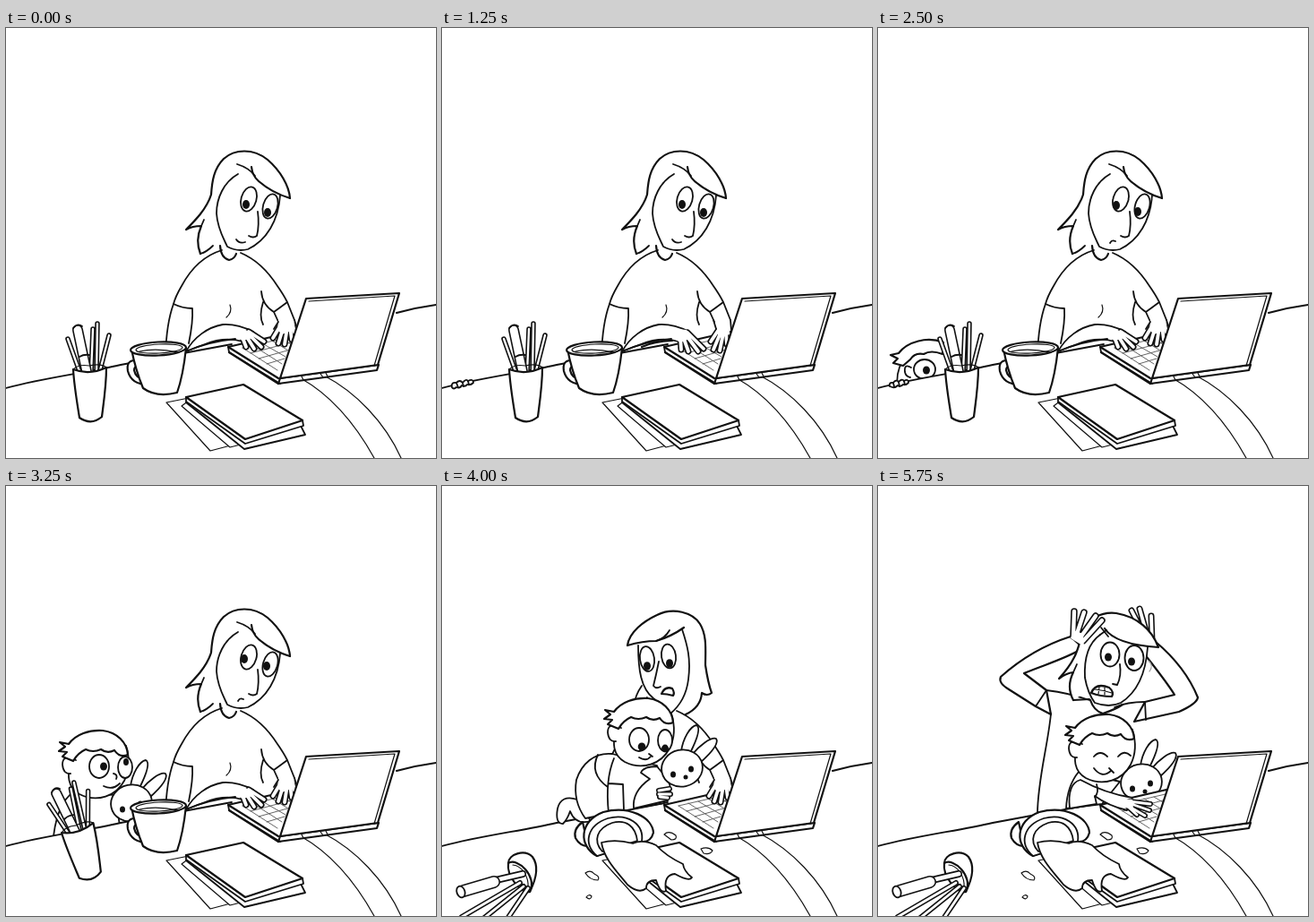
Animation, 480 px wide and 480 px high, one loop 6 s. Source, as an HTML page:

```html
<!DOCTYPE html>
<html lang="en">
<head>
<meta charset="utf-8">
<title>Working at home</title>
<style>
html, body { margin: 0; width: 100%; height: 100%; overflow: hidden; background: #fff; }
svg { display: block; width: 100vw; height: 100vh; }
path, ellipse { fill: #fff; stroke: #111; stroke-width: 1.8; stroke-linejoin: round; stroke-linecap: round; }
.line { fill: none; }
.thin { stroke-width: 1.2; }
.keys { fill: none; stroke: #555; stroke-width: .9; }
.bold { stroke-width: 2.2; }
.dot { fill: #111; stroke: none; }
.bare { stroke: none; }
.tube { fill: none; stroke-width: var(--w); }
.core { stroke: #fff; stroke-width: calc(var(--w) - 3.2px); }
</style>
</head>
<body>
<svg viewBox="0 0 480 480">
<defs>
  <g id="kidHead">
    <path d="M221 290C219 305 218 318 232 326C252 336 273 328 282 311C288 299 288 285 284 272L240 262Z"/>
    <path d="M228 288Q213 281 213 293Q214 304 222 303"/>
    <path class="bold" d="M225 289L213 284L218 279L209 278L216 273L210 268L220 270C228 259 243 254 258 255C274 257 285 268 286 282Q277 286 271 277Q263 281 256 276Q247 280 239 276Q230 280 225 289Z"/>
  </g>
  <g id="kidEyes">
    <ellipse cx="248" cy="301" rx="11" ry="13"/><ellipse cx="277" cy="302" rx="8" ry="12"/>
  </g>
  <g id="lookDown">
    <use href="#kidHead"/><use href="#kidEyes"/>
    <ellipse class="dot" cx="251" cy="309" rx="4.3" ry="4.6"/><ellipse class="dot" cx="277" cy="311" rx="4" ry="4.4"/>
    <path class="line" d="M248 321Q256 326 261 320M259 317L263 320"/>
  </g>
  <g id="lookUp">
    <use href="#kidHead"/><use href="#kidEyes" x="6" y="-6"/>
    <ellipse class="dot" cx="259" cy="295" rx="4" ry="4.6"/><ellipse class="dot" cx="284" cy="290" rx="3" ry="4"/>
    <path class="line" d="M259 317Q269 322 277 314M270 303Q275 304 273 309"/>
  </g>
  <g id="rabbit">
    <path d="M-1 -19C1 -33 9 -47 16 -48C22 -45 15 -29 9 -17Z"/>
    <path d="M11 -15C19 -25 32 -35 38 -33C42 -27 29 -14 20 -6Z"/>
    <ellipse rx="23" ry="20.5" transform="rotate(-12)"/>
    <path class="bare" d="M1 -17L8 -17L17 -10L8 -6Z"/>
    <ellipse class="dot" cx="-10" cy="7" rx="3" ry="3.5"/><ellipse class="dot" cx="10" cy="1" rx="3" ry="3.5"/>
    <ellipse class="dot" cx="4" cy="10" rx="2.5" ry="2.5"/>
  </g>
  <g id="fallenPens">
    <path class="bold" d="M74 421C74 411 92 405 101 414C109 425 104 441 98 453Z"/>
    <path class="bold" d="M74 421C84 414 107 436 98 453C88 455 72 436 74 421Z"/>
    <path class="line thin" d="M79 423C90 424 97 437 96 448"/>
    <path class="tube" style="--w:6px" d="M22 481L87 443M46 483L91 447M73 483L96 449"/>
    <path class="tube" style="--w:8px" d="M60 440L90 433"/>
    <path class="tube" style="--w:14px" d="M24 452L58 442"/>
    <ellipse cx="21" cy="453" rx="4.5" ry="6.5" transform="rotate(-18 21 453)"/>
  </g>
</defs>

<!-- mother at work -->
<g data-on="0-16">
  <path class="bare" d="M242 249Q205 262 187 308L178 358L290 350L322 326L314 306Q296 265 262 250Z"/>
  <path class="line" d="M241 248C218 255 204 273 196 288Q189 300 187 308"/>
  <path data-on="0-13" class="line" d="M187 308Q179 330 178 366M187 308Q197 313 208 313Q209 328 204 352"/>
  <path class="line" d="M262 251C281 259 294 274 303 288Q310 298 314 306Q306 312 299 317Q286 309 285 294M287 306Q282 322 287 331M299 317L304 328M314 306L322 326"/>
  <path class="line thin" d="M250 309Q253 317 246 323"/>
</g>
<g data-on="0-13">
  <path class="bold" d="M317 190C316 176 306 159 292 147C276 134 255 135 243 146C232 157 230 171 229 186C224 202 211 215 201 225Q208 221 218 221Q211 237 217 252"/>
  <path class="line" d="M218 221L221 214M217 252Q224 250 231 243"/>
  <path d="M259 163C243 172 235 190 235 207C236 224 243 235 247 244Q258 250 270 247C291 237 304 215 306 187"/>
  <path class="line bold" d="M239 243Q240 257 249 259Q255 258 257 252"/>
  <path class="line bold" d="M274 155Q275 165 282 171Q297 184 317 190"/>
  <path class="line" d="M258 152Q271 156 278 165"/>
  <path class="line" d="M281 205Q283 220 280 232Q276 235 271 232"/>
  <g data-on="0-2 4-13">
    <ellipse cx="271" cy="191" rx="8.5" ry="14" transform="rotate(16 271 191)"/>
    <ellipse cx="295" cy="199" rx="8" ry="14" transform="rotate(16 295 199)"/>
  </g>
  <g data-on="0-2 4-7"><ellipse class="dot" cx="268" cy="197" rx="4" ry="5"/><ellipse class="dot" cx="292" cy="206" rx="4" ry="5"/></g>
  <g data-on="8-12"><ellipse class="dot" cx="266" cy="198" rx="4" ry="5"/><ellipse class="dot" cx="290" cy="205" rx="4" ry="5"/></g>
  <g data-on="13"><ellipse class="dot" cx="266" cy="193" rx="4" ry="5"/><ellipse class="dot" cx="291" cy="201" rx="4" ry="5"/></g>
  <path data-on="3" class="line bold" d="M262 194Q269 201 278 196M286 202Q294 209 302 204"/>
  <path data-on="0-8" class="line" d="M257 236Q260 241 267 239"/>
  <path data-on="9-13" class="line" d="M259 240Q261 236 265 238"/>
</g>

<!-- mother facing the child -->
<g data-on="14-16">
  <path class="bold" d="M207 178C209 163 225 151 240 144C258 135 280 141 288 154C296 167 294 184 294 200Q297 220 301 231Q296 235 290 231Q289 247 272 255"/>
  <path class="line" d="M223 223Q216 233 214 245Q221 243 229 236"/>
  <path d="M219 178C219 205 222 226 236 237Q241 240 241 246Q246 257 255 254Q272 240 275 216C278 193 274 178 268 160"/>
  <path class="line bold" d="M207 178Q224 173 239 173Q256 168 270 158"/>
  <path class="line" d="M239 173Q249 170 254 161"/>
  <ellipse cx="229" cy="193" rx="8" ry="14" transform="rotate(-8 229 193)"/>
  <ellipse cx="253" cy="190" rx="8" ry="13.5" transform="rotate(-8 253 190)"/>
  <ellipse class="dot" cx="229" cy="201" rx="4" ry="4.8"/><ellipse class="dot" cx="254" cy="198" rx="4" ry="4.8"/>
  <path class="line" d="M242 196Q239 211 236 223Q239 227 244 224"/>
  <path data-on="14" class="line" d="M249 231Q252 233 250 237"/>
  <path data-on="15-16" class="bold" d="M245 232Q249 223 257 226Q260 231 258 234Q251 232 245 232Z"/>
</g>

<!-- mother with raised hands -->
<g data-on="17-21">
  <path class="bare" d="M234 239Q204 242 188 270L178 365L300 350L298 280Q290 255 268 245Z"/>
  <path class="line" d="M229 238C207 243 195 256 187 270M192 290C185 313 178 331 178 366M266 245Q289 254 297 279"/>
  <path d="M165 263C160 286 154 303 153 320Q155 334 166 335C176 329 184 307 193 290L176 283L189 262Z"/>
  <path class="line" d="M176 283L193 290"/>
  <path class="tube" style="--w:7.5px" d="M168 263L158 254L150 244M170 260L155 229M174 259L168 225M178 259L182 229M166 262L158 261"/>
  <path class="bare" d="M163 259L171 248L181 250L187 263L168 269Z"/>
  <path class="line" d="M183 244Q185 255 189 262M159 264L165 267"/>
  <path d="M298 279L304 264Q317 265 319 277L304 291Z"/>
  <path class="tube" style="--w:7.5px" d="M306 275L299 257M310 272L317 240M313 272L331 241M315 275L340 252M315 278L339 266"/>
  <path class="bare" d="M303 273L311 264L320 272L309 286Z"/>
</g>
<g data-on="22-23">
  <path class="bare" d="M188 228L235 238L262 247L298 241L297 262L280 360L178 366L192 254Z"/>
  <path class="line" d="M188 228Q213 231 236 239M264 247Q278 241 298 241M193 254C190 288 178 329 178 366"/>
  <path class="bold" d="M215 168C190 176 165 188 137 213Q134 220 146 227L176 246L193 255L188 228L163 209C187 199 209 193 229 181Z"/>
  <path class="bold" d="M310 174C329 190 346 209 357 236Q356 243 336 252L286 263L298 241L331 233C321 217 307 200 297 187Z"/>
  <path class="line" d="M188 228L176 246M298 241L299 261"/>
  <path class="tube" style="--w:7px" d="M300 172L283 139M302 172L292 137M306 174L305 145"/>
</g>
<g data-on="17-23">
  <path class="bold" d="M313 180C306 161 290 146 266 142C248 140 235 149 229 163C223 177 225 190 202 215Q210 209 218 208Q210 224 218 239"/>
  <path class="line" d="M218 208L222 199M218 239L236 238"/>
  <path d="M248 166C234 176 230 195 231 214Q234 231 242 242Q258 248 271 242C290 230 299 208 301 180"/>
  <path class="line bold" d="M237 239Q241 251 251 254Q266 249 273 244"/>
  <path class="line bold" d="M253 159Q265 177 313 180"/>
  <path class="line" d="M248 166L255 161M249 158L257 168"/>
  <g data-on="17-20">
    <ellipse cx="259" cy="187" rx="8" ry="13" transform="rotate(12 259 187)"/><ellipse cx="286" cy="192" rx="9" ry="14" transform="rotate(12 286 192)"/>
    <ellipse class="dot" cx="257" cy="195" rx="4" ry="4.7"/><ellipse class="dot" cx="283" cy="202" rx="4.2" ry="4.7"/>
  </g>
  <g data-on="21-23">
    <ellipse cx="259" cy="188" rx="10.5" ry="13.5"/><ellipse cx="286" cy="192" rx="10.5" ry="14"/>
    <ellipse class="dot" cx="257" cy="191" rx="4" ry="4.5"/><ellipse class="dot" cx="283" cy="196" rx="4" ry="4.5"/>
  </g>
  <path class="line" d="M270 199Q272 212 267 222L262 221"/>
  <path data-on="17-19" class="line" d="M248 238Q252 230 261 236"/>
  <path data-on="20" class="line bold" d="M246 237Q254 229 263 237"/>
  <path data-on="21-23" class="bold" d="M238 231Q243 219 258 225Q264 230 261 235Q248 235 238 231Z"/>
  <path data-on="21-23" class="line thin" d="M242 227Q252 228 261 231M247 224L246 232M253 225L253 233"/>
</g>
<g data-on="22-23">
  <path class="tube" style="--w:7.5px" d="M218 168L219 140M221 168L230 141M226 169L243 145M229 173L250 150"/>
  <path class="bare" d="M215 170L218 161L229 165L230 179Z"/>
  <path class="line thin" style="stroke:#999" d="M302 195Q308 200 303 207"/>
</g>
<use data-on="17-23" href="#rabbit" x="294" y="331"/>

<!-- child behind the desk -->
<g data-on="8-11">
  <path d="M22 405C18 378 31 358 54 355Q75 355 80 374V410Z"/>
  <path class="bold" d="M28 377L17 374L22 369L14 365L23 363C33 350 55 344 73 351L72 364Q59 359 51 364Q41 362 36 370Z"/>
  <path class="line" d="M37 379Q29 374 30 384Q31 389 36 390"/>
  <ellipse cx="52" cy="381" rx="12" ry="11"/>
  <ellipse data-on="8" class="dot" cx="52" cy="384" rx="4" ry="4.5"/>
  <ellipse data-on="9" class="dot" cx="57" cy="379" rx="4" ry="4.5"/>
  <ellipse data-on="10-11" class="dot" cx="54" cy="382" rx="4" ry="4.5"/>
</g>
<use data-on="12" href="#lookUp" x="-160" y="48"/>
<g data-on="13">
  <path d="M76 341Q55 355 52 402L130 400L122 345Z"/>
  <use href="#rabbit" x="140" y="354"/>
  <use href="#lookUp" x="-150" y="18"/>
</g>

<!-- desk and laptop base -->
<path class="bare" d="M0 402C45 390 90 385 128 376L252 353L438 317L480 309V480H0Z"/>
<path class="line" d="M0 402C45 390 90 385 128 376L252 353"/>
<path class="line bold" d="M436 318Q458 312 480 309"/>
<g data-on="5"><path d="M11 401Q10 395 16 396Q20 392 23 396Q27 391 29 394Q35 391 35 396Q32 399 28 398Q26 401 22 399Q20 403 16 401Q13 404 11 401Z"/><path class="line" d="M16 396L18 401M23 396L24 400M29 394L30 398"/></g>
<g data-on="6-12"><path d="M13 400Q12 395 17 396Q20 392 23 395Q27 391 29 394Q34 391 34 396Q31 399 28 398Q25 401 22 399Q19 402 16 401Z"/><path class="line" d="M17 396L18 400M23 395L24 400M29 394L30 398"/></g>
<path d="M248 356L322 339L340 370L306 397L249 362Z"/>
<path class="line bold" d="M248 356L304 391M249 362L304 397"/>
<path class="keys" d="M264 357L303 382M264 357L321 344M275 354L308 375M286 352L312 367M297 349L315 360M308 347L318 353M273 363L318 351M282 369L314 360M291 375L311 369"/>

<!-- mother's typing hands -->
<g data-on="0-14">
  <path d="M201 361C210 345 225 334 242 331Q258 330 276 339L264 350Q244 344 222 353Z"/>
  <path class="line" d="M201 361Q226 350 256 347"/>
  <g data-on="0 2 4 6 8 10-14">
    <path class="tube" style="--w:7px" d="M263 343L268 356M267 342L277 358M270 341L285 356M271 339L288 350"/>
    <path class="bare" d="M254 335L271 338L276 346L264 349L254 344Z"/>
  </g>
  <g data-on="1 3 5 7 9">
    <path class="tube" style="--w:7px" d="M266 345L267 359M269 344L275 361M272 342L286 361M274 340L292 358"/>
    <path class="bare" d="M254 335L273 337L279 346L266 351L254 344Z"/>
    <path class="line bold" d="M223 356Q236 350 257 349"/>
  </g>
</g>
<g data-on="0-16">
  <g data-on="0 2 4 6 8 10-16">
    <path class="tube" style="--w:7px" d="M307 331L298 346M310 333L304 352M314 334L311 353M317 334L319 348M319 331L322 340"/>
    <path class="bare" d="M304 326L321 326L323 336L308 342L303 337Z"/>
    <path class="line" d="M304 328L299 336M322 326L325 336"/>
  </g>
  <g data-on="1 3 5 7 9">
    <path class="tube" style="--w:7px" d="M308 338L300 350M311 340L303 359M314 341L310 360M317 340L318 353"/>
    <path class="bare" d="M305 329L321 327L321 342L309 346Z"/>
    <path class="line" d="M303 326L306 336M322 326L323 338"/>
  </g>
</g>

<!-- child on the desk -->
<g data-on="14">
  <path d="M106 328C92 340 86 357 86 376L92 391L101 374Q118 367 134 375L151 345L135 332Z"/>
  <path d="M93 389Q97 369 114 368Q134 369 138 381Q135 391 114 392Q100 392 93 389Z"/>
  <path class="line" d="M89 346L103 351Q97 363 94 380M118 369Q127 372 131 379"/>
  <path d="M150 343Q147 360 139 371Q136 384 145 387Q151 377 154 369Q155 377 163 380Q168 361 163 346Z"/>
  <use href="#rabbit" x="170" y="326"/>
  <path class="line" d="M122 341Q137 346 146 356"/>
  <path class="tube" style="--w:6px" d="M153 352L156 343M156 353L162 345M157 354L163 351"/>
  <use href="#lookUp" x="-133" y="5"/>
</g>
<g data-on="15-16" id="crawl">
  <path d="M151 350Q133 344 129 360Q126 377 135 377Q140 372 143 363Q149 379 166 374Z"/>
  <path d="M190 299C170 297 156 310 150 328Q146 352 160 371L248 354L240 312Z"/>
  <path class="line" d="M174 300Q164 321 185 336M192 304Q182 328 186 365M186 332L202 333L203 362"/>
  <path d="M240 313Q225 313 222 320L232 327Q212 341 214 360L252 351Q259 336 249 324Z"/>
  <use href="#rabbit" x="268" y="315"/>
  <path class="tube" style="--w:6px" d="M242 340L254 338M242 344L255 344M243 347L252 348"/>
  <use href="#lookDown" x="-28" y="-18"/>
</g>
<g data-on="17-23">
  <path d="M224 319Q211 335 210 360L250 355L270 330Z"/>
  <g data-on="17-20" id="restArm">
    <path d="M211 361Q212 350 224 349Q238 349 244 358Q246 366 239 367L222 362Z"/>
    <path class="line" d="M213 347Q226 344 241 345M230 362L234 368M236 361L240 369M241 359L244 366"/>
  </g>
  <g data-on="21-23" id="reachArm">
    <path d="M214 360Q211 332 226 328Q253 343 284 348L278 362Q257 357 242 346L244 355Z"/>
    <path class="line" d="M244 333Q247 342 242 347"/>
    <path class="tube" style="--w:6px" d="M280 352L304 355M280 354L303 362M279 357L298 368M279 358L289 367"/>
    <path class="bare" d="M272 349L284 350L285 360L274 359Z"/>
  </g>
  <use data-on="17-20" href="#lookDown"/>
  <g data-on="21-23">
    <use href="#kidHead"/>
    <path class="line" d="M241 302Q248 294 256 302M268 302Q275 294 282 301M241 315Q250 327 260 318M258 315L263 320"/>
  </g>
</g>

<!-- laptop lid and strip -->
<path class="line thin" d="M329 391C363 410 391 444 411 480M355 388C390 406 423 440 441 480"/>
<path class="bold" d="M306 391L304 397L414 382L416 376Z"/>
<path class="bold" d="M335 302L439 296L415 376L306 391Z"/>
<path class="line thin" d="M338 305L434 299L411 377M330 389L332 393M351 386L354 390M357 385L359 389"/>

<!-- notebooks -->
<path class="thin" d="M179 418L204 413L266 462L228 472Z"/>
<path class="thin" d="M196 422L250 468L266 464L204 416Z"/>
<path d="M201 418L266 470L334 454L329 444Z"/>
<path d="M201 412V417L267 464L332 444L331 438Z"/>
<path class="bold" d="M201 412L265 398L331 438L267 459Z"/>

<!-- mug -->
<g data-on="0-13">
  <path class="bold" d="M144 371Q134 371 136 383Q140 398 158 398L153 391Q145 391 143 382Q143 377 148 378Z"/>
  <path class="bold" d="M140 358C143 374 148 390 153 402Q168 413 191 407C196 393 199 376 201 357Z"/>
  <ellipse class="bold" cx="170" cy="358" rx="31" ry="7.5" transform="rotate(-3 170 358)"/>
  <ellipse class="thin" cx="171" cy="358" rx="26" ry="5" transform="rotate(-3 171 358)"/>
  <path class="line thin" d="M149 361Q168 357 192 362"/>
</g>
<g data-on="14-23">
  <path class="bold" d="M157 375Q146 383 149 393Q154 402 163 402Z"/>
  <path class="bold" d="M173 413C152 402 153 374 180 364C209 356 235 370 236 387Q233 398 223 397Z"/>
  <path d="M173 413C157 399 162 379 185 371C207 365 226 377 223 397Z"/>
  <path d="M179 408C168 396 173 382 190 376C206 372 216 380 218 396Z"/>
</g>
<g data-on="14">
  <path d="M180 409Q188 419 204 418Q210 413 207 406Q218 403 228 411Q239 412 238 403Q228 397 210 394Q190 397 180 409Z"/>
  <ellipse class="thin" cx="241" cy="392" rx="5" ry="2.5"/>
</g>
<path data-on="15" d="M178 398Q182 417 203 432Q212 433 216 426Q232 431 246 423Q244 409 218 396Q196 400 178 398Z"/>
<g data-on="16-23">
  <path d="M178 398C181 417 196 431 207 445Q220 456 228 449Q228 440 239 440Q244 456 250 452Q247 434 260 433Q276 442 279 437Q270 430 269 422Q250 413 239 401Q224 394 213 399Q194 394 178 398Z"/>
  <path class="thin" d="M248 389Q253 384 261 390Q263 395 256 395ZM289 405Q297 402 302 407Q299 412 292 410ZM160 432Q166 428 170 433Q177 436 174 440Q165 440 160 432ZM161 459Q164 455 167 458Q166 463 161 459Z"/>
</g>

<!-- pens -->
<g data-on="0-13" id="pens">
  <path class="tube" style="--w:5.5px" d="M69 347L83 386M102 330L101 386M97 336L95 386M115 343L104 386"/>
  <path class="tube" style="--w:12px" d="M80 337L90 384"/>
  <path class="line" d="M75 335Q80 329 85 333M82 367Q87 364 93 365"/>
  <path class="bold" d="M75 381Q93 388 112 379C112 399 109 418 107 434Q95 444 82 435C79 416 76 399 75 381Z"/>
  <path class="line thin" d="M75 381Q81 375 93 377Q106 374 112 379"/>
</g>
<g data-on="14">
  <path class="bold" d="M62 412Q72 397 95 396Q108 403 107 416Q99 432 77 430Q62 424 62 412Z"/>
  <path class="line" d="M71 427C87 425 97 413 96 397M66 422Q82 420 88 403"/>
  <path class="tube" style="--w:10px" d="M34 397L72 403"/>
  <path class="tube" style="--w:9px" d="M42 369L84 402M80 372L80 402"/>
  <path class="tube" style="--w:7px" d="M63 419L76 408"/>
  <ellipse cx="31" cy="397" rx="3.5" ry="5"/><ellipse cx="41" cy="368" rx="4" ry="5"/><ellipse cx="80" cy="370" rx="6" ry="4"/>
</g>
<use data-on="15" href="#fallenPens" transform="translate(-10 -10) rotate(14 85 425)"/>
<use data-on="16-23" href="#fallenPens"/>
</svg>
<script>
const LOOP = 6000, STEP = 250;
const $ = id => document.getElementById(id);

// Hollow strokes: a white core over each black tube.
document.querySelectorAll('.tube').forEach(tube => {
  const core = tube.cloneNode();
  core.classList.add('core');
  tube.after(core);
});

const parts = [...document.querySelectorAll('[data-on]')].map(el => ({
  el,
  spans: el.dataset.on.split(' ').map(s => s.split('-').map(Number))
}));

// Small shifts of a part during single steps.
const shifts = [
  [$('pens'), { 13: 'rotate(-14 93 437)' }],
  [$('crawl'), { 15: 'translate(-38 8)' }],
  [$('restArm'), { 18: 'translate(5 -3)', 20: 'translate(2 1)' }],
  [$('reachArm'), { 22: 'translate(-1 -3)' }]
];

let shown = -1;
function draw() {
  const step = Math.floor(performance.now() % LOOP / STEP);
  if (step !== shown) {
    shown = step;
    for (const { el, spans } of parts) {
      const on = spans.some(([a, b = a]) => step >= a && step <= b);
      el.style.display = on ? '' : 'none';
    }
    for (const [el, moves] of shifts) el.setAttribute('transform', moves[step] || '');
  }
  requestAnimationFrame(draw);
}
draw();
</script>
</body>
</html>
```
